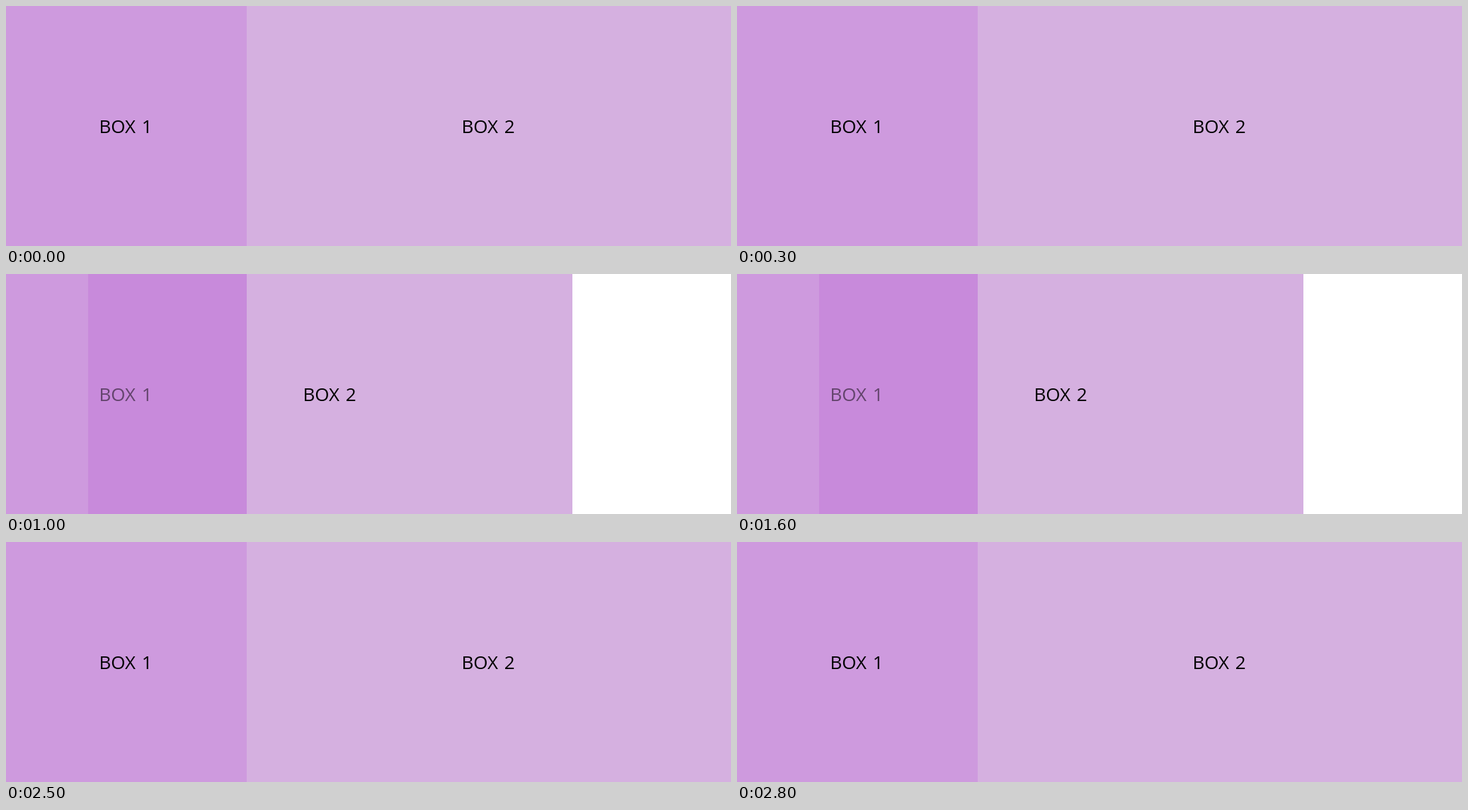
These frames come from a looping animation (1024 by 340 pixels, 3000 ms). An HTML page:

```html
<!DOCTYPE html>
<html lang="en">
<head>
<meta charset="utf-8">
<title>Overlapping boxes</title>
<style>
  html, body { margin: 0; width: 100%; height: 100%; overflow: hidden; background: #fff; }
  svg { display: block; width: 1024px; height: 340px; }
  text { font: 26px "Open Sans", "Noto Sans", sans-serif; word-spacing: 2px; }
</style>
</head>
<body>
<svg viewBox="0 0 1024 340">
  <rect width="340" height="340" fill="#ce9ade"/>
  <text id="label" x="131.5" y="180">BOX 1</text>
  <g id="box">
    <rect width="684" height="340" fill="#d5b0e0"/>
    <rect id="overlap" height="340" fill="#c88adb"/>
    <text x="303.5" y="180">BOX 2</text>
  </g>
  <text id="covered" x="131.5" y="180" opacity="0.5">BOX 1</text>
</svg>
<script>
  const LOOP = 3000, STEP = 500, EDGE = 340;
  const stops = [340, 222, 116, 116, 222, 340]; // left edge of box 2 per step
  const $ = id => document.getElementById(id);

  function draw(ms) {
    const x = stops[Math.floor((ms % LOOP) / STEP)];
    const hidden = x < 134;
    $("box").setAttribute("transform", `translate(${x} 0)`);
    $("overlap").setAttribute("width", EDGE - x);
    $("label").style.display = hidden ? "none" : "";
    $("covered").style.display = hidden ? "" : "none";
  }

  const start = performance.now();
  function tick() {
    draw(performance.now() - start);
    requestAnimationFrame(tick);
  }
  tick();
</script>
</body>
</html>
```
